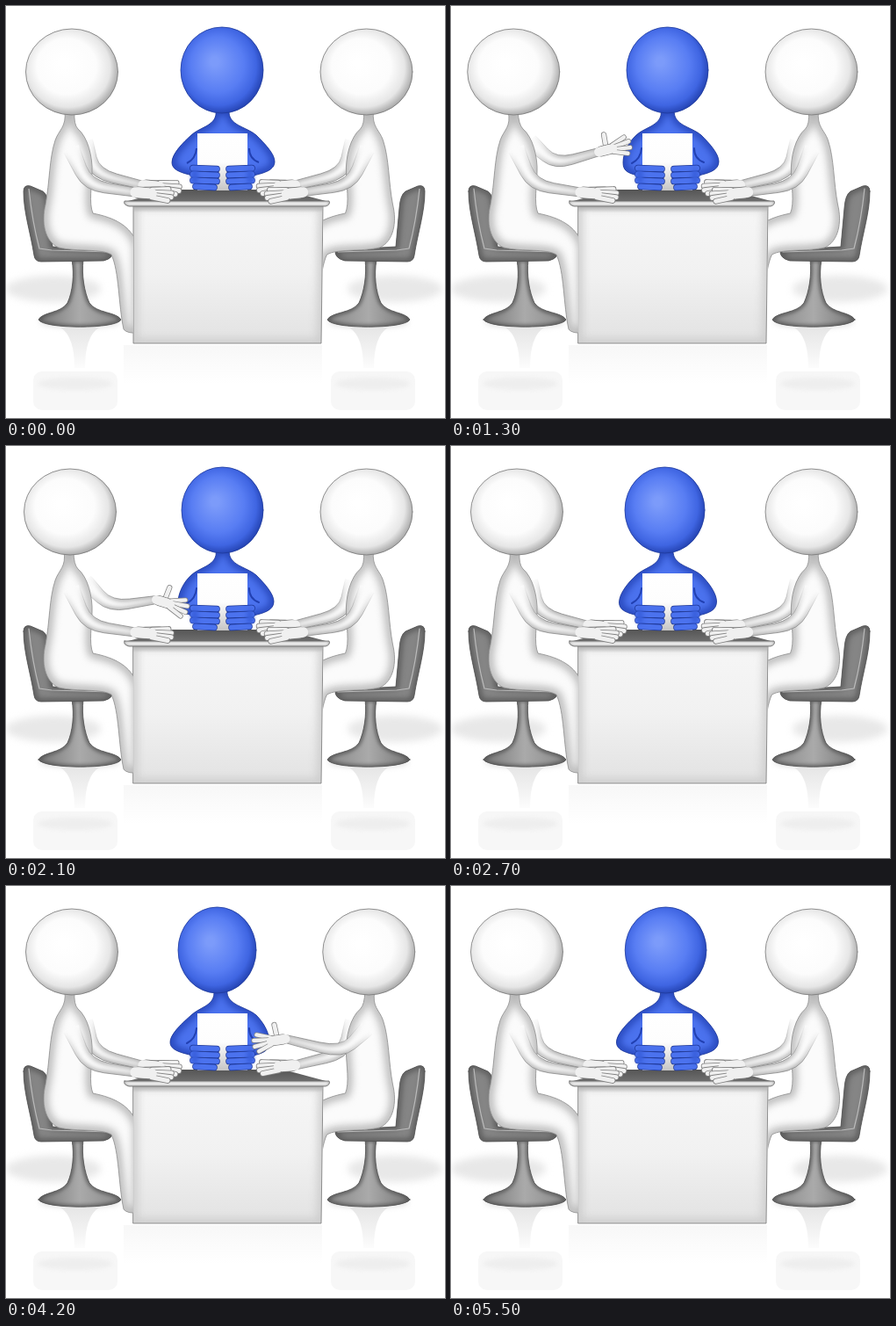
An HTML page with a canvas for the animation above (5600 ms loop, 500 by 469 pixels).

```html
<!DOCTYPE html>
<html lang="en">
<head>
<meta charset="utf-8">
<title>Interview at a desk</title>
<style>
  html, body { margin: 0; width: 100%; height: 100%; overflow: hidden; background: #fff; }
  canvas { display: block; }
</style>
</head>
<body>
<canvas id="stage" width="500" height="469"></canvas>
<script>
const ctx = document.getElementById('stage').getContext('2d');
const LOOP = 5600, STEP = 100, TALK = 1800;
const WHITE = { fill: '#fbfbfb', edge: '#b4b4b4', line: '#8c8c8c' };
const SKIN = { fill: '#f0f0f0', line: '#808080' };
const BLUE = { fill: '#4b72ee', edge: '#2140b2', line: '#1b3494' };
const STEEL = { fill: '#858585', edge: '#555', line: '#505050' };

const mix = (a, b, u) => a + (b - a) * u;
const mixPoint = (p, q, u) => p.map((v, i) => mix(v, q[i], u));
function ramp(t, from, to) {
  const u = Math.min(1, Math.max(0, (t - from) / (to - from)));
  return u * u * (3 - 2 * u);
}

function gradient(x0, y0, x1, y1, ...colors) {
  const g = ctx.createLinearGradient(x0, y0, x1, y1);
  colors.forEach((c, i) => g.addColorStop(i / (colors.length - 1), c));
  return g;
}

// A filled path with soft darkening along its inner edge
function solid(d, { fill, edge, line }, depth = 9) {
  const path = new Path2D(d);
  ctx.fillStyle = fill;
  ctx.fill(path);
  ctx.save();
  ctx.clip(path);
  ctx.filter = `blur(${depth / 2}px)`;
  ctx.strokeStyle = edge;
  ctx.lineWidth = depth;
  ctx.stroke(path);
  ctx.restore();
  ctx.strokeStyle = line;
  ctx.lineWidth = .8;
  ctx.stroke(path);
}

function softEllipse(x, y, rx, ry, color, blur) {
  ctx.save();
  ctx.filter = `blur(${blur}px)`;
  ctx.fillStyle = color;
  ctx.beginPath();
  ctx.ellipse(x, y, rx, ry, 0, 0, 7);
  ctx.fill();
  ctx.restore();
}

function head(x, y, rx, colors, line) {
  ctx.save();
  ctx.translate(x, y);
  ctx.scale(rx, 49);
  const g = ctx.createRadialGradient(-.18, -.2, .1, -.06, -.07, 1.09);
  colors.forEach((c, i) => g.addColorStop([0, .55, .82, 1][i], c));
  ctx.beginPath();
  ctx.arc(0, 0, 1, 0, 7);
  ctx.fillStyle = g;
  ctx.fill();
  ctx.restore();
  ctx.strokeStyle = line;
  ctx.lineWidth = .8;
  ctx.stroke();
}

const whiteHead = x => head(x, 75, 52.5, ['#fff', '#fcfcfc', '#e6e6e6', '#a8a8a8'], '#777');

// Tapered arm with a rounded elbow; its outline fades in from the shoulder
function arm(shoulder, elbow, wrist, thick, thin) {
  const side = (p, q, w) => {
    const len = Math.hypot(q[0] - p[0], q[1] - p[1]);
    return [(p[1] - q[1]) / len * w / 2, (q[0] - p[0]) / len * w / 2];
  };
  const upper = side(shoulder, elbow, thick), middle = side(shoulder, wrist, mix(thick, thin, .5));
  const lower = side(elbow, wrist, thin);
  const at = (p, n, sign) => [p[0] + n[0] * sign, p[1] + n[1] * sign];
  const edgePoints = sign => {
    const s = at(shoulder, upper, sign), e = at(elbow, middle, sign), w = at(wrist, lower, sign);
    return [s, mixPoint(s, e, .6), e, mixPoint(e, w, .4), w];
  };
  const [s, a, e, b, w] = edgePoints(1), [s2, a2, e2, b2, w2] = edgePoints(-1);
  const fade = color => gradient(...shoulder, ...elbow, color + '0', color);
  solid(`M${s}L${a}Q${e} ${b}L${w}L${w2}L${b2}Q${e2} ${a2}L${s2}`,
    { fill: WHITE.fill, edge: fade('#aaa'), line: fade('#888') }, 5);
}

function finger(x0, y0, x1, y1, width, { fill, line }) {
  ctx.lineCap = 'round';
  [[line, width + 1.4], [fill, width]].forEach(([color, w]) => {
    ctx.strokeStyle = color;
    ctx.lineWidth = w;
    ctx.beginPath();
    ctx.moveTo(x0, y0);
    ctx.lineTo(x1, y1);
    ctx.stroke();
  });
}

function hand([x, y], angle, open) {
  const size = mix(1.2, 1.05, open);
  const reach = (x0, y0, a, len, w) =>
    finger(x0, y0, x0 + Math.cos(a) * len, y0 + Math.sin(a) * len, w, SKIN);
  ctx.save();
  ctx.translate(x, y);
  ctx.rotate(angle);
  ctx.scale(size, size);
  reach(9, -3, -.1 - 1.4 * open, 14, 4.5);
  reach(3, 0, 0, 14, 10);
  for (let i = 0; i < 4; i++) {
    const off = i - 1.5;
    reach(16, off * 2.4, off * (.08 + .16 * open), 20 - Math.abs(off) * 3, 4.2);
  }
  ctx.strokeStyle = SKIN.fill;
  ctx.lineWidth = 9.5;
  ctx.beginPath();
  ctx.moveTo(0, 0);
  ctx.lineTo(16, 0);
  ctx.stroke();
  ctx.restore();
}

function mirrored(width, draw) {
  ctx.save();
  ctx.translate(width, 0);
  ctx.scale(-1, 1);
  draw();
  ctx.restore();
}

function chair() {
  const metal = { ...STEEL, fill: gradient(37, 0, 131, 0, '#777', '#aaa', '#888') };
  solid('M37 357C42 348 62 350 70 338C76 325 78 306 75 289L88 289C86 306 89 325 95 338C103 350 126 348 131 357C127 368 42 368 37 357Z', metal, 4);
  solid('M20 211Q20 203 28 205L42 211Q48 215 49 230L53 274L122 278Q123 287 111 290L40 291Q33 291 32 284C28 258 20 235 20 211Z', STEEL, 6);
  ctx.strokeStyle = '#bbb';
  ctx.lineWidth = 1.2;
  ctx.stroke(new Path2D('M26 208Q30 246 38 276L52 278L119 280'));
}

function floorSide() {
  softEllipse(54, 322, 54, 15, '#e8e8e8', 4);
  softEllipse(84, 360, 46, 6, '#ddd', 3);
  ctx.fillStyle = gradient(0, 366, 0, 412, '#e6e6e6', '#fcfcfc');
  ctx.fill(new Path2D('M62 366Q78 376 78 412L90 412Q90 376 106 366Z'));
  ctx.fillStyle = '#f7f7f7';
  ctx.beginPath();
  ctx.roundRect(31, 416, 96, 44, 10);
  ctx.fill();
  softEllipse(79, 430, 42, 7, '#eee', 2);
}

function floor() {
  floorSide();
  mirrored(497, floorSide);
  ctx.fillStyle = gradient(0, 384, 0, 430, '#f7f7f7', '#fff');
  ctx.fillRect(134, 386, 226, 50);
}

function reader(t) {
  const toLeft = ramp(t, 0, 400) - ramp(t, 2400, 3000);
  const toRight = ramp(t, 2400, 3000) - ramp(t, 5300, 5600);
  const x = 246 + .5 * toLeft - 5.5 * toRight;
  const neck = mix(246, x, .4);
  const left = 189 + 7 * toLeft - 2 * toRight, right = 306 - toLeft - 6 * toRight;
  solid(`M${neck - 7} 119C${neck - 5} 136 222 137 211 147C202 155 ${left} 168 ${left} 178
    C${left} 187 200 190 213 193L219 211L276 211L282 193C294 190 ${right} 187 ${right} 177
    C${right} 168 294 156 285 147C273 137 ${neck + 7} 136 ${neck + 8} 119Z`, BLUE, 8);
  ctx.strokeStyle = BLUE.edge;
  ctx.lineWidth = 2;
  ctx.stroke(new Path2D('M217 162Q216 174 206 179M277 162Q277 174 288 178'));
  head(x, 73, 47 - .5 * toLeft - 2.5 * toRight, ['#7c9bfa', '#587df3', '#3f65e2', '#2443b2'], '#1f3a9c');
}

function desk() {
  solid('M145 226L361 226L359 384L145 384Z', {
    fill: gradient(0, 226, 0, 384, '#f6f6f6', '#f1f1f1', '#e2e2e2'), edge: '#cdcdcd', line: '#777'
  }, 10);
  ctx.fillStyle = gradient(0, 227, 0, 235, '#aaa', '#aaa0');
  ctx.fillRect(145, 227, 215, 8);
  ctx.fillStyle = gradient(0, 209, 0, 223, '#555', '#707070');
  ctx.fill(new Path2D('M190 209L316 209L368 223L135 223Z'));
  solid('M135 222L368 222Q370 226 364 228L140 228Q133 226 135 222Z',
    { fill: '#eee', edge: '#aaa', line: '#666' }, 2);
}

function paper() {
  ctx.fillStyle = gradient(0, 145, 0, 211, '#fff', '#fdfdfd', '#c4c4c4');
  ctx.fillRect(218, 145, 57, 65);
  for (let i = 0; i < 4; i++) {
    const y = 185.5 + i * 7, tuck = i === 3 ? 3 : 0;
    finger(213 + tuck, y - 1, 240 - tuck, y, 6.2, BLUE);
    finger(254 + tuck, y, 280 - tuck, y - 1, 6.2, BLUE);
  }
  softEllipse(215, 194, 4, 9, '#3a60dc', 2);
  softEllipse(278, 194, 4, 9, '#3a60dc', 2);
}

function restingArm(shoulder, elbow, wrist) {
  arm(shoulder, elbow, wrist, 19, 10);
  hand(wrist, .08, 0);
}

// The arm lifts quickly, drifts while talking and drops at the end
function talkingArm(u, shoulder, rest, raised) {
  const lift = ramp(u, 0, .25) * ramp(u, 1, .83);
  const [elbow, wrist] = rest.map((p, i) => mixPoint(p, raised[i], lift));
  arm(shoulder, elbow, wrist, 18, 9);
  hand(wrist, mix(.1, raised[2], lift), lift);
}

function torso(lean) {
  ctx.save();
  ctx.beginPath();
  ctx.rect(0, 0, 145, 469);
  ctx.clip();
  solid(`M${67 + lean / 2} 120C69 138 60 141 56 153C49 174 50 200 45 226
    C40 246 44 268 60 275C82 280 108 276 120 283C129 302 128 340 134 368Q138 373 150 372
    L150 272C142 250 124 241 99 236C94 224 98 203 98 190C99 172 93 149 82 140
    Q77 135 ${78 + lean / 2} 120Z`, WHITE, 10);
  ctx.restore();
}

const FAR = { shoulder: [90, 154], rest: [[102, 191], [156, 204]] };
const NEAR = { shoulder: [74, 162], rest: [[93, 204], [147, 212]] };

function leftGuest(u) {
  const lean = -4 * Math.sin(Math.PI * u), drift = ramp(u, .35, .83);
  talkingArm(u, FAR.shoulder, FAR.rest,
    [[119, mix(180, 183, drift)], [mix(168, 171, drift), mix(166, 175, drift)], mix(-.25, .3, drift)]);
  torso(lean);
  restingArm(NEAR.shoulder, ...NEAR.rest);
  whiteHead(75 + lean);
}

function rightGuest(u) {
  const lean = 2.8 * Math.sin(Math.PI * u);
  mirrored(485.5, () => {
    restingArm(FAR.shoulder, ...FAR.rest);
    ctx.save();
    ctx.beginPath();
    ctx.rect(0, 0, 124.5, 469);
    ctx.clip();
    torso(-lean);
    ctx.restore();
    talkingArm(u, NEAR.shoulder, NEAR.rest, [[103, 190], [167, 174], .15]);
  });
  whiteHead(410.5 + lean);
}

function draw(t) {
  const talk = start => Math.min(1, Math.max(0, (t - start) / TALK));
  ctx.fillStyle = '#fff';
  ctx.fillRect(0, 0, 500, 469);
  floor();
  chair();
  mirrored(497, chair);
  reader(t);
  desk();
  paper();
  leftGuest(talk(600));
  rightGuest(talk(3400));
}

const start = performance.now();
let shown = -1;
function tick() {
  const t = Math.floor((performance.now() - start) % LOOP / STEP) * STEP;
  if (t !== shown) draw(shown = t);
  requestAnimationFrame(tick);
}
tick();
</script>
</body>
</html>
```
